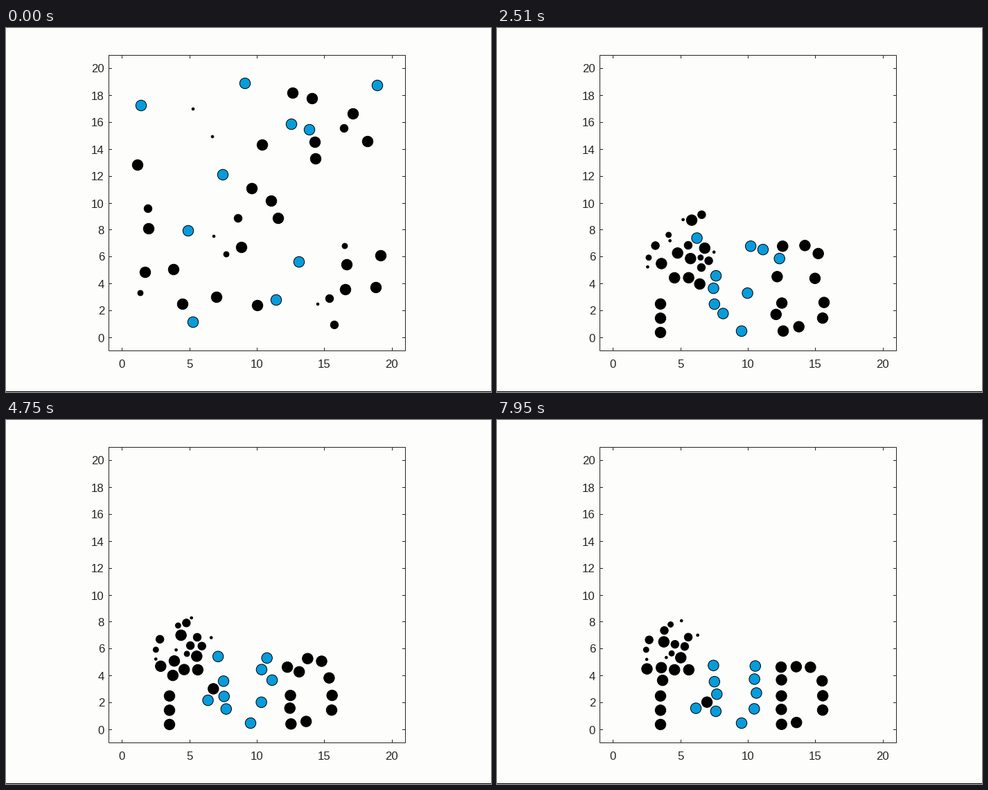
Write a matplotlib script that moves like this. It is 700 px wide and 526 px high and loops after 7.99 s.

```python
import numpy as np
import matplotlib.pyplot as plt
from matplotlib.animation import FuncAnimation

W, H, DPI = 700, 526, 100
FRAMES, INTERVAL = 235, 34
PX = 72 / DPI                      # points per pixel
PAPER, INK, BLUE, ICON = "#fdfdfc", "#262626", "#069cdb", "#858585"

fig = plt.figure(figsize=(W / DPI, H / DPI), dpi=DPI, facecolor=PAPER)
ax = fig.add_axes([0, 0, 1, 1])
ax.set_xlim(0, W)
ax.set_ylim(H, 0)
ax.axis("off")


def line(pts, color=INK, width=1):
    x, y = zip(*pts)
    return ax.plot(x, y, color=color, lw=width * PX, snap=False,
                   solid_capstyle="butt", solid_joinstyle="miter")[0]


# ---- plot box, ticks and labels ----
LEFT, RIGHT, TOP, BOTTOM, TICK = 148.5, 576.5, 39.5, 466.5, 4.5


def label(x, y, value, ha):
    ax.text(x, y, str(value), ha=ha, va="baseline", color=INK,
            family="Liberation Sans", fontsize=16.7 * PX)


line([(LEFT, TOP), (RIGHT, TOP), (RIGHT, BOTTOM), (LEFT, BOTTOM), (LEFT, TOP - 0.5)])
for v in range(0, 21, 5):
    x = np.floor(LEFT + (v + 1) * (RIGHT - LEFT) / 22) + 0.5
    line([(x, BOTTOM), (x, BOTTOM - TICK)])
    line([(x, TOP), (x, TOP + TICK)])
    label(x - 0.5, 491, v, "center")
for v in range(0, 21, 2):
    y = np.floor(BOTTOM - (v + 1) * (BOTTOM - TOP) / 22) + 0.5
    line([(LEFT, y), (LEFT + TICK, y)])
    line([(RIGHT, y), (RIGHT - TICK, y)])
    label(142, y + 6, v, "right")
line([(0, 525.5), (W, 525.5)], "black")

# ---- hover toolbar ----
TOOLBAR_ON, TOOLBAR_OFF = 400, 1650
toolbar = []


def stroke(*pts, width=1.4):
    toolbar.append(line(pts, ICON, width))


def magnifier(cx, plus):
    cy, a = 23.5, np.linspace(0, 2 * np.pi, 40)
    stroke(*zip(cx + 7.3 * np.cos(a), cy + 7.3 * np.sin(a)))
    stroke((cx - 3.5, cy), (cx + 3.5, cy))
    if plus:
        stroke((cx, cy - 3.5), (cx, cy + 3.5))
    stroke((cx + 5.5, cy + 5.5), (cx + 10.5, cy + 10.5), width=2.6)


stroke((458, 27), (455, 27), (455, 32), (470, 32), (470, 27), (467, 27))
stroke((459, 27), (460, 23), (464, 20), (468, 20))
stroke((466, 16.5), (470, 20), (466, 23.5))
toolbar += ax.fill([474, 474, 470], [29, 33.5, 33.5], color=ICON, lw=0)
stroke((485, 34), (480, 26), (482, 25), (485, 28), (483, 19), (487, 24),
       (488, 16.5), (490, 24), (492, 16.5), (493, 25), (497, 19.5),
       (496, 28), (494, 34), (485, 34))
magnifier(512.5, True)
magnifier(537.5, False)
stroke((554, 26), (564, 16.5), (574, 26))
stroke((557, 24), (557, 34), (562, 34), (562, 28), (566, 28), (566, 34),
       (571, 34), (571, 24))

# ---- swarm: every dot has a start and a goal ----
STEP = 20.6                        # spacing of dots within a letter
BIG, MID, SMALL, TINY = 7.7, 5.7, 3.9, 1.8
starts, goals, radii, colors = [], [], [], []


def column(x, y, n, step=STEP):
    return [(x, y + k * step) for k in range(n)]


def row(x, y, n):
    return [(x + k * STEP, y) for k in range(n)]


def group(radius, begin, end, color="black"):
    starts.extend(begin)
    goals.extend(end)
    radii.extend([radius] * len(begin))
    colors.extend([color] * len(begin))


# stem, bar and three stragglers
group(BIG,
      [(255, 399), (201, 353), (242, 349), (446, 165),
       (355, 232), (370, 169), (206, 290), (340, 317),
       (442, 102), (447, 189), (190, 198)],
      column(236, 440, 4, -STEP) + row(215, 361, 4)
      + [(238, 323), (262, 345), (311, 407)])

# two uprights, the foot and one straggler
group(BIG,
      [(195, 112), (263, 293), (270, 425), (423, 338),
       (438, 147), (345, 80), (536, 83), (313, 212),
       (390, 393), (412, 139)],
      column(314, 358, 4) + column(372, 358, 4) + [(353, 438), (290, 418)],
      BLUE)

# left side, top, right side and foot
group(BIG,
      [(304, 389), (414, 94), (363, 401), (393, 275), (490, 378),
       (501, 124), (522, 164),
       (383, 250), (541, 329), (534, 375), (492, 342)],
      column(410.5, 357.5, 5) + row(431, 359.5, 2)
      + column(470, 378, 3) + [(432, 437.5)])

# cloud above the bar
group(MID,
      [(488, 145), (205, 261), (335, 275), (467, 391), (474, 429)],
      [(240, 305), (276, 314), (219, 318), (268, 326), (255, 323)])
group(SMALL,
      [(489, 315), (318, 327), (194, 383)],
      [(250, 338), (215, 332), (250, 296)])
group(TINY,
      [(270, 117), (298, 157), (300, 301), (450, 399)],
      [(244, 346), (266, 291), (216, 346), (288, 310)])

start, goal, radius = map(np.array, (starts, goals, radii))
start, goal = start.astype(float), goal.astype(float)
away = start - goal
dist = np.hypot(*away.T)
away /= dist[:, None]
reach = radius[:, None] + radius + 3      # closest two centres may come
np.fill_diagonal(reach, 0)

SPEED, SETTLE = 130, 2.0           # px per second, seconds
queue = 0.3 * np.clip(dist - 90, 0, None)


def spread(pos, left):
    """Push overlapping dots apart; those nearer their goal yield less."""
    firm = left + 2
    share = firm[:, None] / (firm[:, None] + firm)
    for _ in range(14):
        gap = pos[:, None] - pos
        size = np.hypot(gap[..., 0], gap[..., 1]) + 1e-6
        push = 0.6 * share * np.clip(reach - size, 0, None) / size
        pos = pos + (gap * push[..., None]).sum(axis=1)
    return pos


def positions(sec):
    """Fly straight at the goal, then wait in a slowly shrinking queue."""
    waiting = queue * np.exp(-(sec - 2.5) / SETTLE)
    left = np.minimum(dist, np.maximum(dist - SPEED * sec, waiting))
    return spread(goal + away * left[:, None], left)


swarm = ax.scatter(*start.T, s=(2 * radius * PX) ** 2, c=colors,
                   edgecolors="black", linewidths=PX, zorder=3)


def draw(i):
    t = i * INTERVAL
    swarm.set_offsets(positions(t / 1000))
    for part in toolbar:
        part.set_visible(TOOLBAR_ON <= t < TOOLBAR_OFF)
    return [swarm, *toolbar]


anim = FuncAnimation(fig, draw, frames=FRAMES, interval=INTERVAL,
                     init_func=lambda: draw(0), repeat=True, repeat_delay=0)
plt.show()
```
